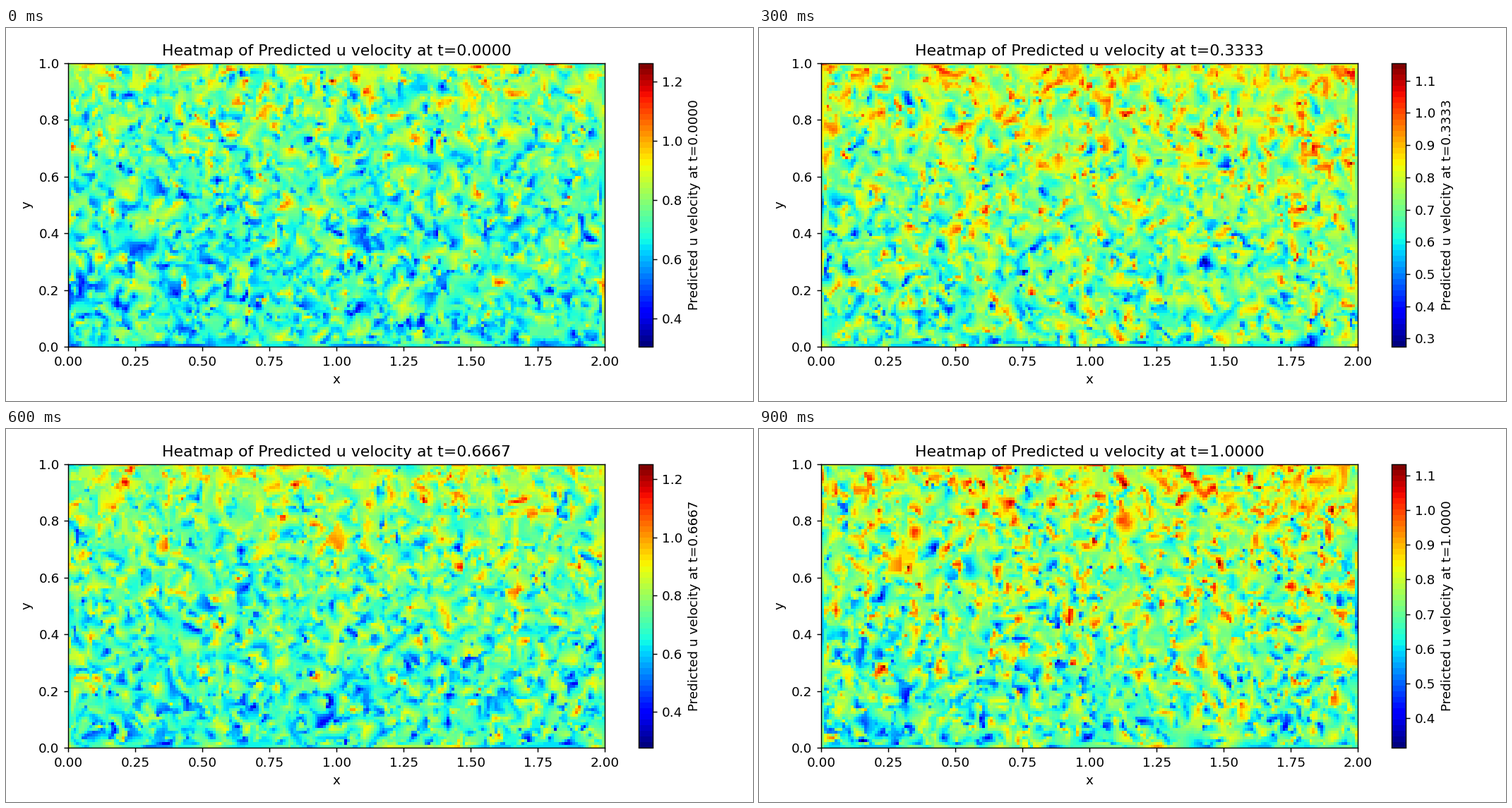
A matplotlib script for the animation above (1 s loop, 1058 by 529 pixels).

```python
import numpy as np
import matplotlib.pyplot as plt
from matplotlib.animation import FuncAnimation
from matplotlib.tri import LinearTriInterpolator, Triangulation

W, H = 1058, 529
FRAMES = 10
NX, NY = 200, 100
POINTS = 5200
CORNERS = np.array([(0, 0), (2, 0), (0, 1), (2, 1)])

# Colour range of each time step
LIMITS = [
    (0.304, 1.264), (0.282, 1.232), (0.254, 1.250), (0.274, 1.155),
    (0.298, 1.246), (0.302, 1.260), (0.276, 1.252), (0.246, 1.297),
    (0.326, 1.324), (0.315, 1.133),
]


def box(left, top, right, bottom):
    """Axes rectangle from pixel edges measured from the top left."""
    return [left / W, 1 - bottom / H, (right - left) / W, (bottom - top) / H]


def velocity(step):
    """Noisy samples at scattered points, interpolated onto a grid."""
    rng = np.random.default_rng(100 + step)
    scattered = rng.random((POINTS, 2)) * (2, 1)
    x, y = np.vstack([scattered, CORNERS]).T
    u = 0.665 + 0.09 * y + 0.05 * y**5 + 0.012 * x
    u += rng.normal(0, 0.135, x.size)
    gx, gy = np.meshgrid((np.arange(NX) + 0.5) * 2 / NX,
                         (np.arange(NY) + 0.5) / NY)
    grid = LinearTriInterpolator(Triangulation(x, y), u)(gx, gy)
    return np.ma.filled(grid, 0.72)


fields = [velocity(step) for step in range(FRAMES)]

plt.rcParams["font.family"] = "DejaVu Sans"
fig = plt.figure(figsize=(8, 4), dpi=W / 8)
ax = fig.add_axes(box(88.4, 49.6, 848.4, 452.2))
cax = fig.add_axes(box(896.2, 49.6, 916.3, 452.2))

image = ax.imshow(fields[0], extent=(0, 2, 0, 1), origin="lower",
                  aspect="auto", interpolation="nearest",
                  cmap=plt.get_cmap("jet", 50))
bar = fig.colorbar(image, cax=cax)
ax.set_xlabel("x")
ax.set_ylabel("y")


def update(step):
    name = f"Predicted u velocity at t={step / (FRAMES - 1):.4f}"
    image.set_data(fields[step])
    image.set_clim(*LIMITS[step])
    ax.set_title(f"Heatmap of {name}")
    bar.set_label(name)
    return image,


anim = FuncAnimation(fig, update, frames=FRAMES, init_func=lambda: update(0),
                     interval=100, repeat=True, repeat_delay=0, blit=False)
plt.show()
```
